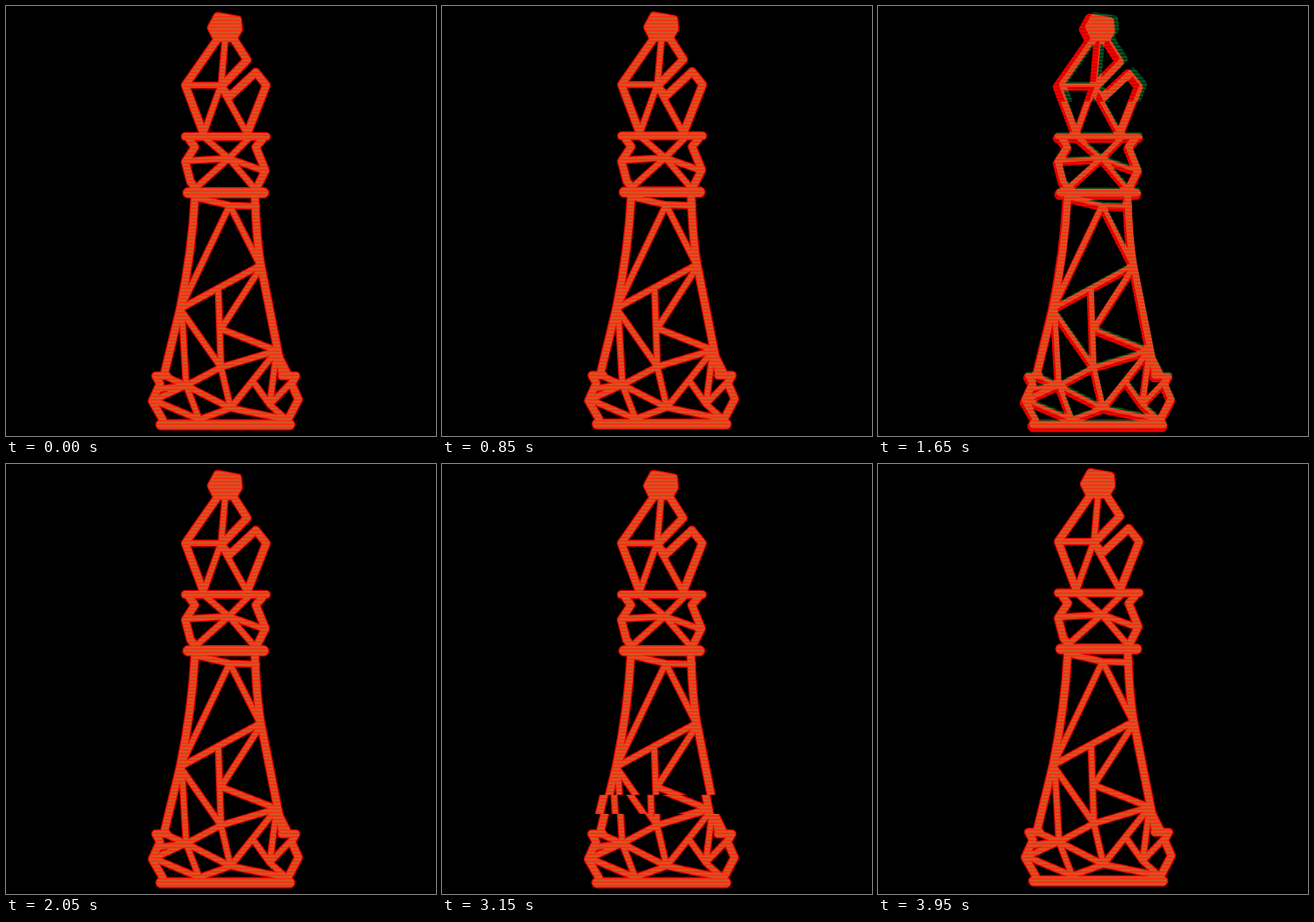
Recreate the animation shown at these times as an HTML page with a canvas. Size 494 by 494 pixels, loop 4 s.

```html
<!DOCTYPE html>
<html lang="en">
<head>
<meta charset="utf-8">
<title>Glitching bishop</title>
<style>
  html, body { margin: 0; height: 100%; overflow: hidden; background: #000; }
  canvas { display: block; width: 100vw; height: 100vh; }
</style>
</head>
<body>
<canvas id="stage" width="494" height="494"></canvas>
<script>
const SIZE = 494, LOOP = 4000, STEP = 50;
const ctx = document.getElementById('stage').getContext('2d');

const outline = new Path2D(`
  M243 38 L206 91 227 147 M261 37 L277 62 247 93 257 104 287 76 299 91 277 147
  M206 150 H299 M211 154 L217 162 206 179 212 202 219 211
  M294 154 L287 162 298 189 287 211
  M217 220 Q214 280 200 348 L182 422 M286 220 Q288 272 293 299 L317 420
  M185 425 H172 L177 434 168 454 180 475 M317 425 H333 L328 434 336 452 324 475`);

const struts = new Path2D(`
  M252 36 L247 93 M206 91 H247 L227 147 M247 93 L277 147
  M228 151 L256 175 280 151 M206 178 L256 175 298 190
  M217 210 L256 175 286 210
  M222 221 L257 229 288 230 M205 338 L257 229 292 298 200 348 247 415 311 396 247 371 293 300
  M244 328 L247 415 M202 350 L207 436
  M176 440 L207 436 247 415 258 462 207 436 170 453 222 475 207 436 182 425
  M222 475 L258 462 322 475 303 458 328 432 M258 462 L311 396 303 458 285 433
  M311 396 L325 424`);

const bars = new Path2D('M209 214.5 H296 M178 481 H326');
const head = new Path2D('M243 12 L266 16 267 27 261 37 242 37 236 25Z');

// Shake of the whole figure: key poses of one 1.1 s cycle.
const SHAKE_TICKS = 22;
const poses = [
  { at: 0, x: 0, y: 0 }, { at: 2, x: 0, y: 0 }, { at: 4, x: 3, y: -1 }, { at: 9, x: 2, y: -1 },
  { at: 11, x: 0, y: 2 }, { at: 13, x: 1, y: -2 }, { at: 19, x: 0, y: 0 }, { at: 22, x: 0, y: 0 }
];

// Bursts in which a band tears sideways and the green ink drifts.
const bursts = [
  { at: 1200, top: 268, bottom: 346, red: 1, green: -9, drift: [-1, 0] },
  { at: 1650, top: 0, bottom: 110, red: 0, green: 5, drift: [1, -3] },
  { at: 2400, top: 112, bottom: 206, red: 0, green: -13, drift: [-2, 1] },
  { at: 3150, top: 380, bottom: 402, red: -6, green: -6, drift: [0, 0] }
];
const calm = { top: 0, bottom: 0, red: 0, green: 0, drift: [0, 0] };

function shake(tick) {
  const t = tick % SHAKE_TICKS;
  const i = poses.findIndex(p => p.at > t);
  const a = poses[i - 1], b = poses[i];
  const k = (t - a.at) / (b.at - a.at);
  return { x: a.x + (b.x - a.x) * k, y: a.y + (b.y - a.y) * k };
}

function drawFigure(color, trim, x, y) {
  const stroke = (path, width) => {
    ctx.lineWidth = width - trim;
    ctx.stroke(path);
  };
  ctx.save();
  ctx.translate(x, y);
  ctx.strokeStyle = ctx.fillStyle = color;
  ctx.lineCap = ctx.lineJoin = 'round';
  stroke(outline, 10.5);
  stroke(struts, 8.5);
  stroke(bars, 13);
  stroke(head, 10.5);
  ctx.fill(head);
  ctx.restore();
}

function drawInk(color, trim, x, y, { top, bottom }, shift) {
  const strips = [[0, top, 0], [top, bottom, shift], [bottom, SIZE, 0]];
  for (const [from, to, slide] of strips) {
    ctx.save();
    ctx.beginPath();
    ctx.rect(0, from, SIZE, to - from);
    ctx.clip();
    drawFigure(color, trim, x + slide, y);
    ctx.restore();
  }
}

function drawScanlines() {
  ctx.globalCompositeOperation = 'multiply';
  for (let y = 0; y < SIZE; y++) {
    const wave = 0.5 - 0.5 * Math.cos(y * Math.PI / 2);
    const red = 255 - 55 * wave, rest = 110 + 145 * wave;
    ctx.fillStyle = `rgb(${red}, ${rest}, ${rest})`;
    ctx.fillRect(0, y, SIZE, 1);
  }
}

function draw(time) {
  const now = Math.floor(time % LOOP / STEP) * STEP;
  const { x, y } = shake(now / STEP);
  const burst = bursts.find(b => now >= b.at && now < b.at + 2 * STEP) || calm;
  const [driftX, driftY] = burst.drift;

  ctx.globalCompositeOperation = 'source-over';
  ctx.fillStyle = '#000';
  ctx.fillRect(0, 0, SIZE, SIZE);
  ctx.globalCompositeOperation = 'lighten'; // overlapping strokes keep one flat tone
  drawInk('#f00', 0, x, y, burst, burst.red);
  drawInk('#005f28', 2.5, x + driftX, y + driftY, burst, burst.green);
  drawScanlines();
}

function frame() {
  draw(performance.now());
  requestAnimationFrame(frame);
}
frame();
</script>
</body>
</html>
```
